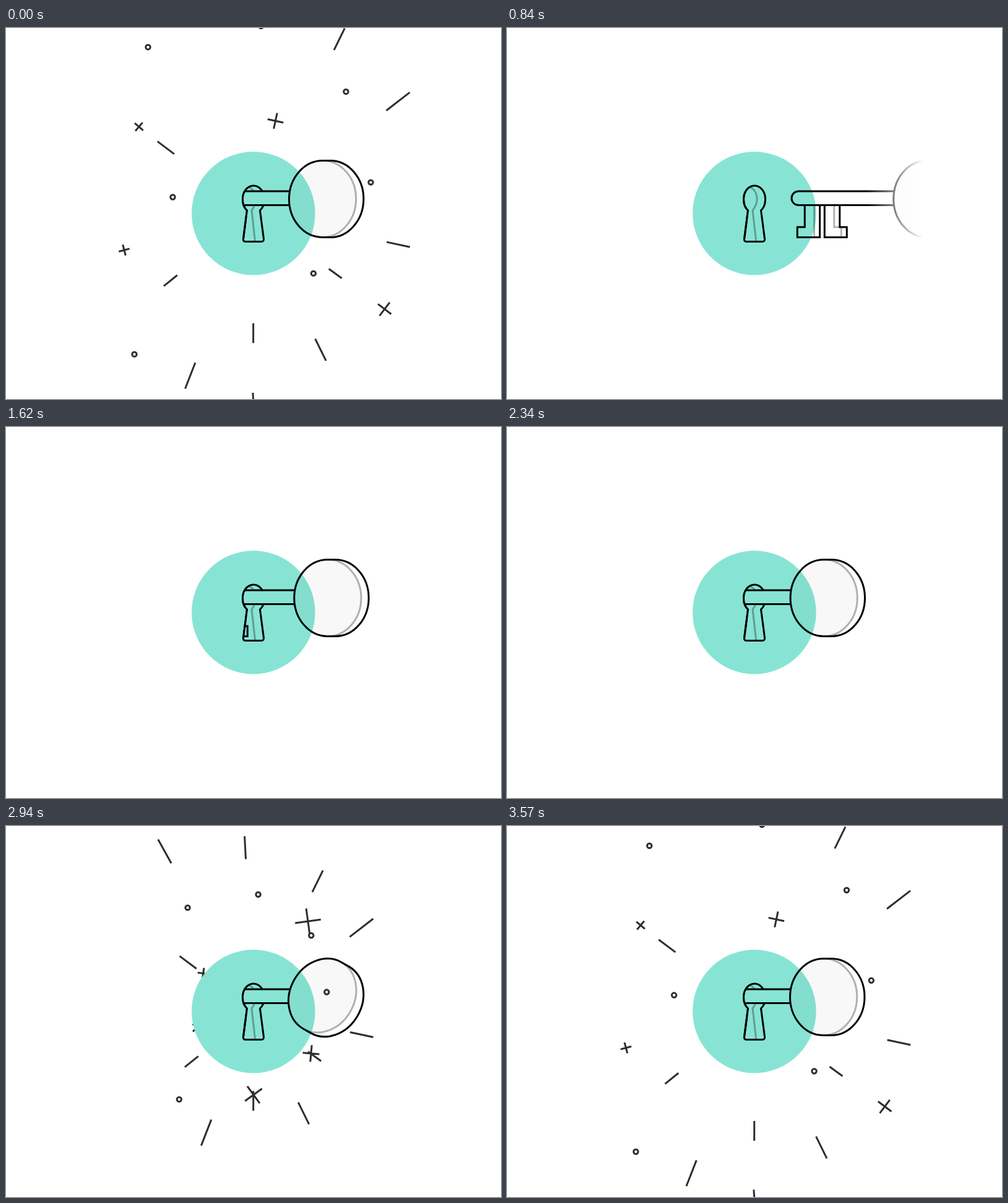
Animation, 800 px wide and 600 px high, one loop 3600 ms. Source, as an HTML page with a canvas:

```html
<!DOCTYPE html>
<html lang="en">
<head>
<meta charset="utf-8">
<title>Key and lock</title>
<style>
html, body { margin: 0; width: 100%; height: 100%; overflow: hidden; background: #fff; }
canvas { display: block; }
</style>
</head>
<body>
<canvas id="stage" width="800" height="600"></canvas>
<script>
const ctx = document.getElementById('stage').getContext('2d');
const LOOP = 3600, TEAL = '#87e4d4', INK = '#2d2e31', DEPTH = 'rgba(0,0,0,.3)';
const RAD = Math.PI / 180;

// Rays: angle, travel, length
const rays = [
  [111.3, 287.6, 45], [-143.1, 181, 34], [-37.8, 302, 48], [-63.8, 321, 39],
  [12.1, 244.5, 38.5], [36.3, 167.6, 26], [63.8, 251, 39.5], [90.1, 197.7, 32],
  [141, 176.3, 28], [-119, 405, 44], [-92.9, 363, 37]
];
// Rings: final offset from the centre
const rings = [
  [-176, -277.7], [154.3, -203.4], [-134.7, -27.4], [195.6, -52],
  [100, 100], [-198.7, 235], [12.6, -313]
];
// Crosses: final offset, final angle, size
const crosses = [
  [-194, -147, 43, 18], [37.2, -157, 15, 26], [-219, 62, -12, 18],
  [222, 162, 40, 27], [0, 321.5, -1, 34], [210, -348, 27, 42]
];

const disc = new Path2D();
disc.arc(399.8, 299.8, 99.8, 0, 7);
const holeLeft = 'C390.5 255 382.5 264 382.5 277 C382.5 285 385 291 389.5 295 L383.5 341 Q383 345.5 387.5 345.5';
const hole = new Path2D('M400 255 ' + holeLeft +
  ' H412.5 Q417 345.5 416.5 341 L410.5 295 C415 291 417.5 285 417.5 277 C417.5 264 409.5 255 400 255Z');
const holeDepth = new Path2D('M393 257.5 C400 261 404 268 404 277 C404 285 400 291 397 295 L402.5 344');
const inFront = new Path2D('M800 0 H400 V255 ' + holeLeft + ' V600 H800Z');
const shaft = new Path2D('M520 264 H304 A11.3 11.3 0 0 0 304 286.6 H520');
const teeth = new Path2D('M314 287 V322 H302 V338.5 H338.3 V287 M346 287 V338.5 H382 V322 H370.5 V287');
const teethDepth = new Path2D('M329.3 288 V337 M361.5 288 V322 H370 M373 323 V337');

const expoOut = (t, duration) =>
  t <= 0 ? 0 : t >= duration ? 1 : 1 - 2 ** (-10 * t / duration);

function stroke(path, color = '#000') {
  ctx.strokeStyle = color;
  ctx.stroke(path);
}

function scoped(draw) {
  ctx.save();
  draw();
  ctx.restore();
}

function segment(x, y, angle, length) {
  const dx = Math.cos(angle * RAD) * length / 2, dy = Math.sin(angle * RAD) * length / 2;
  ctx.moveTo(x - dx, y - dy);
  ctx.lineTo(x + dx, y + dy);
}

function drawBurst(u) {
  const rayP = expoOut(u - 2000, 1800);
  const ringP = expoOut(u - 2100, 1800);
  const crossP = expoOut(u - 2200, 1800);
  ctx.beginPath();
  if (rayP) for (const [angle, travel, length] of rays) {
    const r = travel * rayP;
    segment(400 + r * Math.cos(angle * RAD), 300 + r * Math.sin(angle * RAD), angle, length);
  }
  if (ringP) for (const [dx, dy] of rings) {
    const x = 400 + dx * ringP, y = 300 + dy * ringP;
    ctx.moveTo(x + 3.7, y);
    ctx.arc(x, y, 3.7, 0, 7);
  }
  if (crossP) for (const [dx, dy, angle, size] of crosses) {
    const x = 400 + dx * crossP, y = 300 + dy * crossP, a = angle - 60 * (1 - crossP);
    segment(x, y, a, size);
    segment(x, y, a + 90, size);
  }
  ctx.strokeStyle = INK;
  ctx.stroke();
}

// The bow is a thick round plate turning about the shaft.
function bowShape(turn, shift) {
  const c = Math.abs(Math.cos(turn)), s = Math.sin(turn);
  const hx = 25 * .487 * c, hy = 25 * (turn < Math.PI / 2 ? -s : s);
  const half = Math.hypot(hx, hy) / 2, minor = 62 * .873 * c, q = Math.PI / 2;
  const place = new DOMMatrix()
    .translate(517.7 - 2 * s + shift, 276.5 + 3.9 * s)
    .rotate(Math.atan2(hy, hx) / RAD);
  const make = (...arcs) => {
    const local = new Path2D(), path = new Path2D();
    for (const [x, from, to] of arcs) local.ellipse(x, 0, minor, 62, 0, from, to);
    if (arcs.length > 1) local.closePath();
    path.addPath(local, place);
    return path;
  };
  return {
    outline: make([-half, q, 3 * q], [half, -q, q]),
    face: make([-half, 0, 4 * q]),
    rim: make([-half, -q, q])
  };
}

function drawKey(u) {
  const shift = 423 * (1 - expoOut(u, 1800));
  const bow = bowShape(Math.PI * expoOut(u - 1918, 1200), shift);

  scoped(() => {
    ctx.clip(inFront);
    const outside = new Path2D();
    outside.rect(0, 0, 800, 600);
    outside.addPath(bow.outline);
    ctx.clip(outside, 'evenodd');
    scoped(() => {
      ctx.clip(disc);
      ctx.translate(shift, 0);
      ctx.fillStyle = TEAL;
      ctx.fill(shaft);
      ctx.fill(teeth);
    });
    ctx.translate(shift, 0);
    stroke(teethDepth, DEPTH);
    stroke(teeth);
    stroke(shaft);
  });

  ctx.fillStyle = 'rgba(0,0,0,.027)';
  ctx.fill(bow.face);
  stroke(bow.rim, DEPTH);
  stroke(bow.outline);

  // The key slides in out of a white haze.
  if (u < 1800) {
    const haze = ctx.createLinearGradient(580, 0, 672, 0);
    haze.addColorStop(0, 'rgba(255,255,255,0)');
    haze.addColorStop(1, '#fff');
    ctx.fillStyle = haze;
    ctx.fillRect(580, 0, 220, 600);
  }
}

function frame(now) {
  const u = (now + LOOP - 600) % LOOP;
  ctx.fillStyle = '#fff';
  ctx.fillRect(0, 0, 800, 600);
  ctx.lineWidth = 3;
  drawBurst(u);
  ctx.fillStyle = TEAL;
  ctx.fill(disc);
  stroke(holeDepth, DEPTH);
  stroke(hole);
  drawKey(u);
  scoped(() => {
    ctx.beginPath();
    ctx.rect(0, 0, 389, 600);
    ctx.clip();
    stroke(hole);
  });
  requestAnimationFrame(frame);
}
requestAnimationFrame(frame);
</script>
</body>
</html>
```
